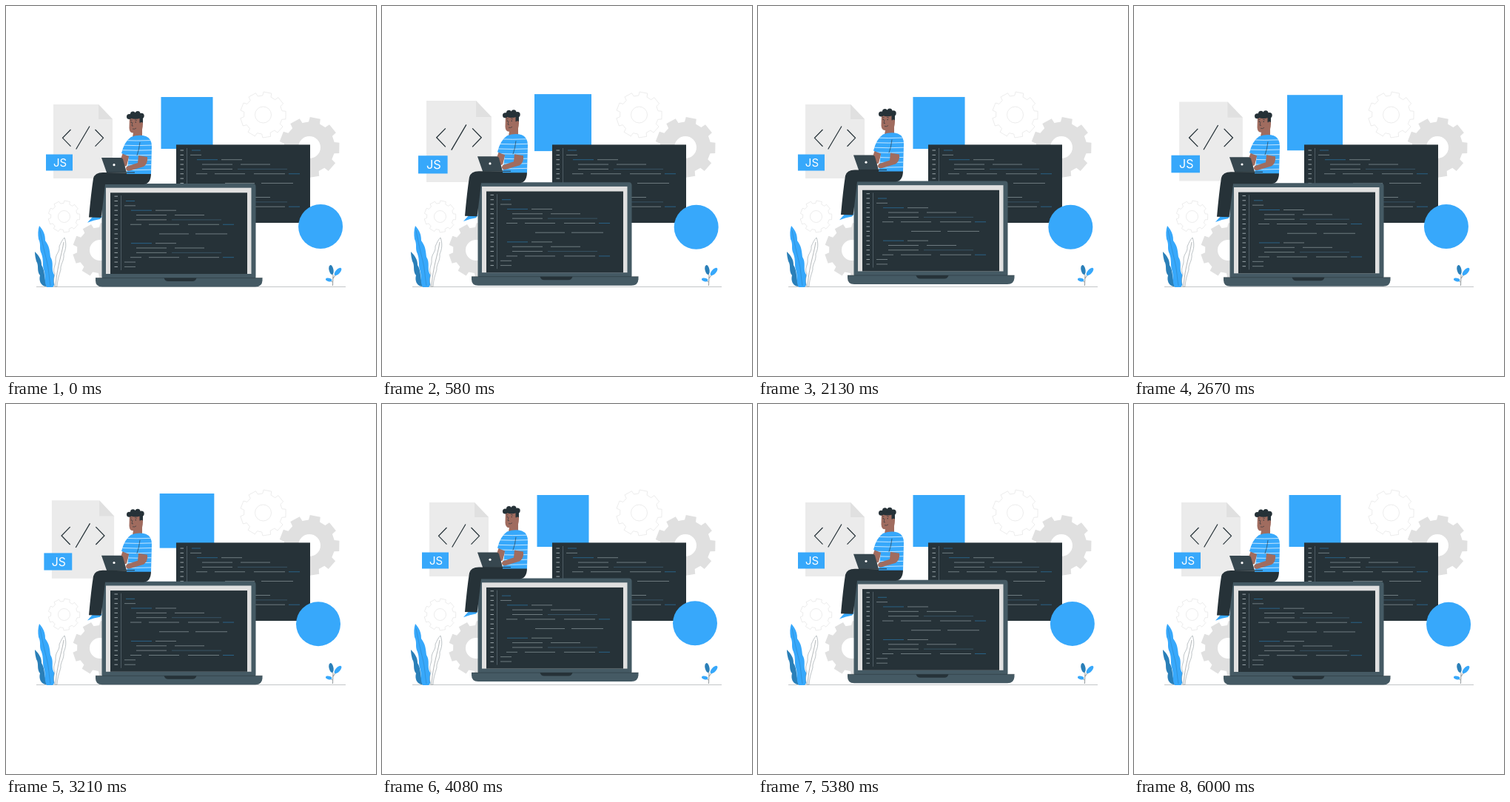
Recreate the animation shown at these times as an HTML page. Size 500x500 px, loop 6.04 s.

```html
<!DOCTYPE html>
<html lang="en">
<head>
<meta charset="utf-8">
<title>Coding scene</title>
<style>
  html, body { margin: 0; width: 100%; height: 100%; overflow: hidden; background: #fff; }
  svg { display: block; width: 100vw; height: 100vh; }
  .blue { fill: #37a8fb; }
  .deep { fill: #2a7fb8; }
  .dark { fill: #263238; }
  .steel { fill: #455a64; }
  .skin { fill: #a06c5f; }
  .line { fill: none; stroke: #263238; }
  .pale { fill: #e0e0e0; }
  .thin { fill: #fff; stroke: #e0e0e0; stroke-width: .6; }
</style>
</head>
<body>
<svg viewBox="0 0 500 500">
  <defs>
    <g id="code"></g>
    <path id="shirt" d="M169 177Q180 173 189 176Q197 179 197 190L196 227H163L166 203L156 199Q160 183 169 177Z"/>
    <clipPath id="shirtClip"><use href="#shirt"/></clipPath>
    <clipPath id="windowClip"><rect x="230" y="192" width="181" height="101"/></clipPath>
  </defs>

  <g id="gears"></g>

  <g id="file">
    <path d="M64 133H125L144 153V233H64Z" fill="#ebebeb"/>
    <path class="pale" d="M125 133V153H144Z"/>
    <path class="line" stroke-width="1.2" d="M87.500 167L76.500 178.300L87.500 189.700M113 162.500L94.700 193.500M120.500 167L131.500 178.300L120.500 189.700"/>
    <rect class="blue" x="54" y="200.500" width="36" height="22"/>
    <text x="73" y="217" text-anchor="middle" font-family="Inter, sans-serif" font-size="15" fill="#fff">JS</text>
  </g>

  <rect id="badge" class="blue" x="209.500" y="123" width="70" height="70"/>

  <rect class="dark" x="230" y="187.400" width="181" height="105.600"/>
  <g clip-path="url(#windowClip)">
    <use href="#code" x="89" y="-68.500"/>
  </g>

  <circle id="disc" class="blue" r="30"/>

  <path d="M41 379.500H459" stroke="#b4b8ba" stroke-width=".8"/>

  <g id="plants">
    <path class="deep" d="M39 332C45 338 48 343 48 350C53 358 51 365 55 379C47 379 44 371 46 364C41 358 45 351 41 345C40 341 39 337 39 332Z"/>
    <path class="blue" d="M45 297C51 304 53 309 53 317C59 325 59 331 60 339C65 347 61 354 64 361C68 367 67 377 63 380H55C51 372 54 365 51 356C49 349 51 344 48 335C44 327 48 323 44 315C43 309 43 303 45 297Z"/>
    <path fill="none" stroke="#2a7fb8" stroke-width=".5" d="M46 303C49 320 52 332 55 344S58 366 60 378"/>
    <path d="M79 313C82 321 81 329 78 335C79 345 73 349 74 356C72 364 70 367 69 379H66C64 373 64 369 66 362C62 355 68 350 67 343C67 335 73 332 72 325C74 320 76 316 79 313Z" fill="#fff" stroke="#6c7a80" stroke-width=".45"/>
    <path class="line" stroke-width=".35" d="M78 319C75 338 69 352 67 378"/>
    <path class="line" stroke-width=".5" d="M441.500 378L442 364L440 359M442 368L448 360M441 373L437 370"/>
    <ellipse class="deep" cx="439.500" cy="356.500" rx="3" ry="6.500" transform="rotate(-12 439.500 356.500)"/>
    <ellipse class="blue" cx="448.500" cy="359" rx="3" ry="6.500" transform="rotate(42 448.500 359)"/>
    <ellipse class="blue" cx="436.200" cy="370" rx="4.300" ry="2.200" transform="rotate(14 436.200 370)"/>
  </g>

  <g id="floating">
    <g id="laptop">
      <rect class="steel" x="129.500" y="240" width="208" height="130" rx="4"/>
      <rect x="135" y="245.700" width="196.500" height="116.300" fill="#e0e0e0"/>
      <rect class="dark" x="141" y="252.300" width="185" height="109.700"/>
      <use href="#code"/>
      <path class="steel" d="M121 367.500H346.500V371Q346 379.500 337 379.500H130Q121 379.500 121 371Z"/>
      <path class="line" stroke-width=".5" d="M121 367.500H346.500"/>
      <path class="dark" d="M213.500 367.500H257.500Q256 372 252 372H219Q215 372 213.500 367.500Z"/>
    </g>
    <g id="coder">
      <path class="blue" d="M130 284L127 288Q119 289 110 292.700Q114 288 118 284Z"/>
      <path class="dark" d="M196 226Q196 240 186 241L134 241Q131 268 128.500 286L112 285.500Q115 252 118 233Q120 225 131 225Z"/>
      <path class="skin" d="M158 198L167 201L163 216L156 218L153 213Z"/>
      <path class="skin" d="M167 150H184Q186 160 184 167V177Q177 180 171 177L172 171.500Q167 172 166.500 165Z"/>
      <g class="dark">
        <ellipse cx="175" cy="148.500" rx="9" ry="4.200"/>
        <circle cx="166.500" cy="149.500" r="3.500"/><circle cx="171.500" cy="146" r="3.500"/>
        <circle cx="178" cy="145.500" r="3.500"/><circle cx="183" cy="148.500" r="3.700"/>
        <rect x="180.500" y="149" width="4.500" height="10" rx="2"/>
      </g>
      <circle class="skin" cx="183" cy="159" r="2"/>
      <path class="line" stroke-width=".6" d="M168 154.500L170.500 154M174 154L177 154.500M171 157L170 162H172M171 166Q174 167 176 165"/>
      <circle class="dark" cx="169.300" cy="157" r=".7"/><circle class="dark" cx="175.200" cy="157" r=".7"/>
      <use href="#shirt" class="blue"/>
      <path id="stripes" clip-path="url(#shirtClip)" fill="none" stroke="#fff" stroke-width=".7"/>
      <path class="line" stroke-width=".6" d="M181 184Q180 194 177 202"/>
      <path class="skin" d="M179 202L191 204Q192 213 186 217L166 223Q160 222 163 217L178 212Z"/>
      <path d="M129 205H155Q157 205 158 207L163 225H136Z" fill="#37474f"/>
      <path class="line" stroke-width="1" d="M136 225H174"/>
      <circle cx="146" cy="214.700" r="1.600" fill="#fff"/>
    </g>
  </g>
</svg>
<script>
const LOOP = 6040;
const byId = id => document.getElementById(id);

function add(parent, tag, attrs) {
  const node = document.createElementNS("http://www.w3.org/2000/svg", tag);
  for (const key in attrs) node.setAttribute(key, attrs[key]);
  parent.appendChild(node);
}

function gear(cx, cy, radius, hole, className, turn) {
  const teeth = 9, step = 2 * Math.PI / teeth;
  const corners = [[-.25, 1], [.25, 1], [.32, .84], [.68, .84]];
  let d = "";
  for (let i = 0; i < teeth; i++) {
    for (const [part, reach] of corners) {
      const angle = turn + (i + part) * step;
      const x = cx + radius * reach * Math.cos(angle);
      const y = cy + radius * reach * Math.sin(angle);
      d += (d ? "L" : "M") + x.toFixed(2) + " " + y.toFixed(2);
    }
  }
  d += `ZM${cx - hole} ${cy}a${hole} ${hole} 0 1 0 ${2 * hole} 0a${hole} ${hole} 0 1 0 ${-2 * hole} 0Z`;
  add(byId("gears"), "path", { d, class: className, "fill-rule": "evenodd", "stroke-linejoin": "round" });
}

function buildCode() {
  const code = byId("code");
  const rowY = row => 263.5 + row * 6.35;
  const dash = (row, x1, x2, stroke, width = .7) =>
    add(code, "path", { d: `M${x1} ${rowY(row)}H${x2}`, stroke, "stroke-width": width });
  const gray = "#8f9b a0".replace(" ", ""), blue = "#2b78a9", dim = "#3f6076";
  for (let row = -1; row < 15; row++) dash(row, 146.5, 151, "#a9b4b8", .9);
  add(code, "path", { d: "M155.500 256V357", stroke: "#607078", "stroke-width": .7 });

  const wide = [[168, 183], [193, 234], [246, 288], [293, 308, blue]];
  const narrow = [[160, 175]];
  const pair = [[176, 217], [228, 268]];
  const fading = [[176, 217], [224, 291, dim]];
  const header = [[169, 197, blue], [202, 230]];
  const rows = {
    0: [[162, 174, blue]], 1: narrow, 2: header, 3: pair, 4: fading, 5: wide,
    7: [[207, 247], [256, 299]], 9: header, 10: pair, 11: fading, 12: wide, 13: narrow, 14: narrow
  };
  for (const row in rows)
    for (const [x1, x2, color = gray] of rows[row]) dash(+row, x1, x2, color);
}

gear(347.5, 147, 31, 11, "thin", .02);
gear(410, 191, 41, 15, "pale", .02);
gear(78.5, 284.5, 21.5, 8, "thin", .02);
gear(127, 330, 37, 14, "pale", .02);
buildCode();

let stripes = "";
for (let y = 181.5; y < 226; y += 6.6) stripes += `M155 ${y}Q176 ${y + 1} 198 ${y}`;
byId("stripes").setAttribute("d", stripes);

// The CSS "ease" curve, solved by bisection.
function ease(x) {
  let low = 0, high = 1;
  const bezier = (a, b, u) => 3 * a * u * (1 - u) ** 2 + 3 * b * u * u * (1 - u) + u ** 3;
  for (let i = 0; i < 18; i++) {
    const mid = (low + high) / 2;
    if (bezier(.25, .25, mid) < x) low = mid; else high = mid;
  }
  return bezier(.1, 1, low);
}

const beats = [[0, 1], [604, 1.1], [2416, 1], [3020, 1.1], [3700, 1], [LOOP, 1]];
function pulse(time) {
  const next = beats.findIndex(([at]) => at > time);
  const [start, from] = beats[next - 1], [end, to] = beats[next];
  return from + (to - from) * ease((time - start) / (end - start));
}

const scaleAbout = (id, x, y, scale) =>
  byId(id).setAttribute("transform", `translate(${x} ${y}) scale(${scale}) translate(${-x} ${-y})`);

function draw(time) {
  const scale = pulse(time);
  scaleAbout("file", 104, 183, scale);
  scaleAbout("badge", 244.5, 162, scale);

  const lift = 5.5 * Math.sin(2 * Math.PI * time / LOOP) ** 2;
  byId("floating").setAttribute("transform", `translate(0 ${-lift})`);

  const angle = 2 * Math.PI * time / LOOP + .15;
  byId("disc").setAttribute("cx", 423.5 + 1.6 * Math.cos(angle));
  byId("disc").setAttribute("cy", 297.7 + 1.6 * Math.sin(angle));
}

const begin = performance.now();
function tick() {
  draw((performance.now() - begin) % LOOP);
  requestAnimationFrame(tick);
}
tick();
</script>
</body>
</html>
```
